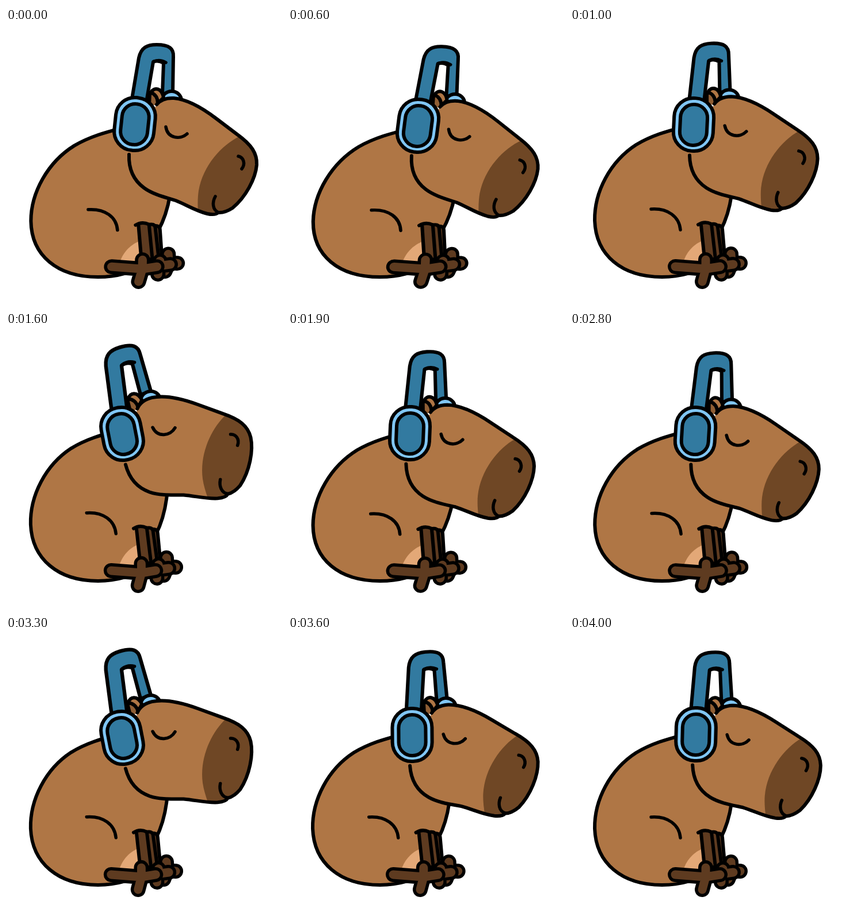
Animation of 480x480 px, one loop 4200 ms. Source, as an HTML page:

```html
<!DOCTYPE html>
<html lang="en">
<head>
<meta charset="utf-8">
<title>Capybara with headphones</title>
<style>
  html, body { margin: 0; height: 100%; overflow: hidden; background: #fff; }
  svg { display: block; width: 100vw; height: 100vh; }
  .o { stroke: #000; stroke-width: 6; stroke-linecap: round; stroke-linejoin: round; }
  .fur { fill: #af7645; }
  .dark { fill: #5e3b20; }
  .blue { fill: #327aa0; }
  .sky { fill: #80c6f4; }
  .line { fill: none; stroke-width: 5.5; }
  .paw { fill: none; stroke-linecap: round; stroke-linejoin: round; }
</style>
</head>
<body>
<svg viewBox="0 0 480 480">
  <defs>
    <path id="skull" d="M262 133Q272 121 292 122C315 124 340 138 365 157L402 185C427 203 437 218 436 238C434 262 417 294 394 313Q380 322 369 321Q364 326 350 323C330 318 315 308 295 300C275 294 255 289 240 278C221 264 213 245 214 220"/>
    <clipPath id="skullClip"><use href="#skull"/></clipPath>
  </defs>

  <g id="body">
    <path class="o fur" d="M215 167C185 176 150 182 115 203C70 232 42 285 43 335C45 395 90 433 160 433Q185 433 205 427L245 420L262 352Q276 325 281 290L285 260"/>
    <path class="o line" d="M141 315C170 313 190 328 192 351"/>
    <path fill="#e3a877" d="M197 407C204 386 217 376 230 370L234 406Z"/>
    <path class="o dark" d="M252 344Q264 341 265 350L269 396L258 400Z"/>
    <path class="o dark" d="M243 342Q256 338 257 347L264 402L250 404Z"/>
    <path class="o dark" d="M223 342Q234 335 246 341L253 402L234 402L228 343"/>
    <g id="paws"></g>
  </g>

  <g id="head">
    <g id="band">
      <path class="o blue" d="M217 135L231 52C235 34 245 29 262 29C284 29 292 36 291 50L290 114H272L274 61Q264 55 256 59L243 135"/>
      <path class="o line" d="M257 58Q268 54 278 60"/>
    </g>
    <g id="face">
      <ellipse class="o sky" cx="288" cy="126" rx="17" ry="16"/>
      <path class="o" fill="#8f5e34" d="M249 134L250 115Q258 109 264 116L266 134"/>
      <path class="o fur" d="M252 112C258 102 271 104 274 121L264 131Q264 117 252 112"/>
      <use href="#skull" class="fur"/>
      <path clip-path="url(#skullClip)" fill="#6f4725" d="M407 188C375 203 342 240 335 283Q332 302 335 335H450V190Z"/>
      <use href="#skull" class="o" fill="none"/>
      <path class="o line" d="M278 172C281 192 303 195 315 184M404 223C413 225 417 236 410 245M364 293C359 302 358 316 370 321"/>
    </g>
    <g transform="rotate(6)">
      <rect class="o sky" x="-34.5" y="-46" width="69" height="92" rx="33"/>
      <rect class="o blue" x="-23.5" y="-35" width="47" height="71" rx="23"/>
    </g>
  </g>
</svg>
<script>
const el = id => document.getElementById(id);

// Each paw is a set of thick toes: a black pass, then a narrower brown pass.
const paws = [
  'M281 408L280 393M281 408L296 409M281 408L275 423',
  'M262 414L266 405M262 414L284 411M262 414L263 428',
  'M183 415L236 419L236 403M236 419L261 415M236 419L230 441'
];
el('paws').innerHTML = paws.map(d =>
  [['#000', 26], ['#5e3b20', 15]].map(([color, width]) =>
    `<path class="paw" d="${d}" stroke="${color}" stroke-width="${width}"/>`).join('')
).join('');

// drawing step, head tilt, ear cup x, ear cup y, body lean
const poses = [
  [0, 0, 224, 167, .35],
  [1, 0, 224, 167, .35],
  [4, 1.3, 226, 170, .75],
  [7, -3.2, 215, 168, 0],
  [9, -8, 210, 169, -.1],
  [11, -17, 202, 177, -.15],
  [13, -3.6, 212, 176, .5],
  [17, 5.5, 236, 192, 1],
  [19, -2.5, 218, 177, .2],
  [21, -13, 206, 173, -.3],
  [22, -17, 202, 177, -.15],
  [24, -6.5, 216, 172, -.05],
  [27, -4.5, 219, 171, 0]
];

function poseAt(step) {
  const i = poses.findIndex(p => p[0] >= step);
  const to = poses[i], from = poses[Math.max(0, i - 1)];
  const u = (step - from[0]) / (to[0] - from[0] || 1);
  return from.map((v, j) => v + (to[j] - v) * u);
}

function draw(now) {
  // Two drawings per 300 ms, held for 100 and 200 ms.
  const tick = Math.floor(now % 4200 / 100);
  const step = tick < 3 ? 0 : Math.floor(tick / 3) * 2 + (tick % 3 ? 1 : 0);
  const [, tilt, x, y, lean] = poseAt(step);
  const scaled = s => `scale(${s}) translate(-224 -167)`;

  el('body').setAttribute('transform',
    `matrix(${1 + .035 * lean} 0 ${-.055 * lean} ${1 - .02 * lean} ${17.9 * lean} ${8.7 * lean})`);
  el('head').setAttribute('transform', `translate(${x} ${y}) rotate(${tilt})`);
  el('band').setAttribute('transform', scaled(1 + .003 * Math.abs(tilt)));
  el('face').setAttribute('transform', scaled(1 - .0064 * Math.max(tilt, 0)));
  requestAnimationFrame(() => draw(performance.now()));
}
draw(0);
</script>
</body>
</html>
```
